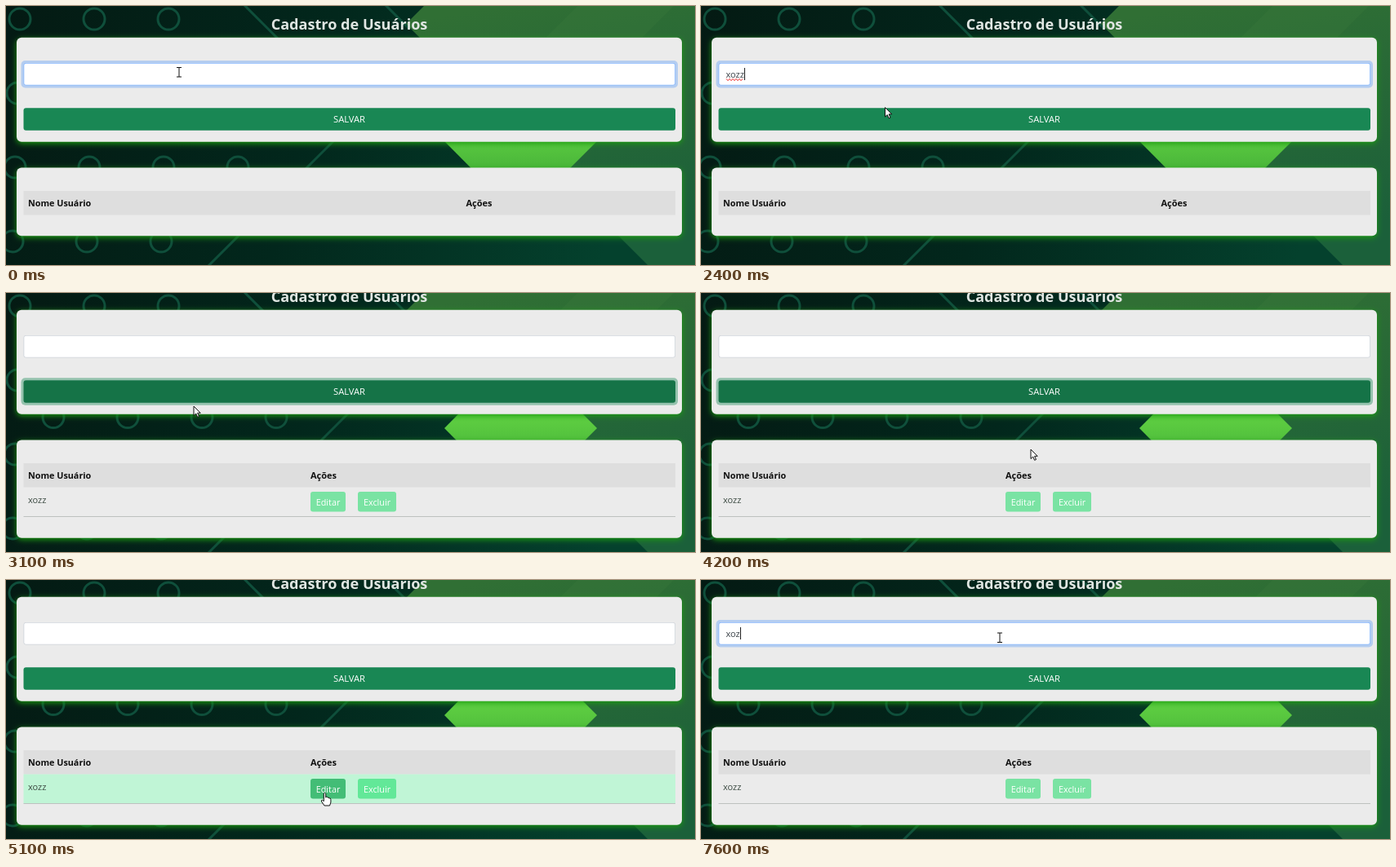
These frames come from a looping animation (844x318 px, 8 s). An HTML page with a canvas:

```html
<!DOCTYPE html>
<html lang="pt-BR">
<head>
<meta charset="utf-8">
<title>Cadastro de Usuários</title>
<style>
html, body { margin: 0; width: 100%; height: 100%; overflow: hidden; background: #02231a; }
canvas { display: block; }
</style>
</head>
<body>
<canvas id="stage" width="844" height="318"></canvas>
<script>
const c = document.getElementById('stage').getContext('2d');
const LOOP = 8000, NAME = 'xozz', TEAL = '#0f4f3b';
const FONT = '"Open Sans", "Noto Sans", sans-serif';

// Moments of the story, in ms
const PRESS = 2900, SAVED = 3100, BLUR = 5000, EDIT = 5300, REFOCUS = 6500, ERASE = 7300;

// Areas in page coordinates: x, y, width, height
const FIELD = [21.5, 70, 798.5, 27.5], SAVE = [21.5, 125.3, 798.5, 27.4], ROW = [21.5, 256.5, 798.5, 36];
const ACTIONS = { Editar: [373, 262, 43, 24.5], Excluir: [431, 262, 47, 24.5] };

const clamp = (v, a, b) => Math.min(b, Math.max(a, v));
const mix = (a, b, k) => `rgb(${a.map((v, i) => Math.round(v + (b[i] - v) * k))})`;
const grow = ([x, y, w, h], d) => [x - d, y - d, w + 2 * d, h + 2 * d];

function pointer(t) {
  let x = 212, y = 81;
  const glide = (from, to, tx, ty) => {
    const k = 1 - (1 - clamp((t - from) / (to - from), 0, 1)) ** 2;
    x += (tx - x) * k;
    y += (ty - y) * k;
  };
  glide(2000, 2800, 230, 139);
  glide(3600, 4200, 404, 192);
  glide(4400, 5000, 390.5, 261);
  glide(5400, 6200, 366, 70.5);
  return [x, y];
}

const scrollAt = t => t >= SAVED ? 18 : 0;

function over(t, [x, y, w, h]) {
  const [px, py] = pointer(t), v = py + scrollAt(t);
  return px >= x && px < x + w && v >= y && v < y + h;
}

// Hover amount with a 150 ms fade
function hover(t, area) {
  let n = 0;
  for (let i = 0; i < 6; i++) n += over(t - i * 25, area);
  return n / 6;
}

function letters(t) {
  if (t < SAVED) return clamp(Math.floor((t - 300) / 380) + 1, 0, 4);
  return t < EDIT ? 0 : t < ERASE ? 4 : 3;
}

function poly(fill, ...pts) {
  c.beginPath();
  pts.forEach(([x, y]) => c.lineTo(x, y));
  c.closePath();
  c.fillStyle = fill;
  c.fill();
}

function box(area, r, fill) {
  c.beginPath();
  c.roundRect(...area, r);
  c.fillStyle = fill;
  c.fill();
}

function text(s, x, y, size, color, weight = 400, align = 'left') {
  c.font = `${weight} ${size}px ${FONT}`;
  c.textAlign = align;
  c.fillStyle = color;
  c.fillText(s, x, y);
}

function fade(x0, y0, x1, y1, ...colors) {
  const g = c.createLinearGradient(x0, y0, x1, y1);
  colors.forEach((v, i) => g.addColorStop(i / (colors.length - 1), v));
  return g;
}

// Diagonal stroke, going left for a negative dx
function diagonal(x, y, dx) {
  c.beginPath();
  c.moveTo(x, y);
  c.lineTo(x + dx, y + Math.abs(dx));
  c.stroke();
}

function background() {
  c.fillStyle = fade(0, 0, 760, 200, '#041a13', '#02271c', '#04412d');
  c.fillRect(0, 0, 844, 318);
  c.strokeStyle = TEAL;
  c.lineWidth = 3;
  for (let k = 0; k < 7; k++) {
    const n = Math.abs(k - 4) < 2 ? 4 : 3;
    for (let i = 0; i < n; i++) {
      c.beginPath();
      c.arc(17 - 1.5 * k + 45.5 * (k % 2) + 91 * i, 16 + 45.5 * k, 13, 0, 7);
      c.stroke();
    }
  }
  diagonal(291, -2, 45);
  diagonal(464, -2, 30);
  diagonal(425, 142, -180);
  poly(fade(600, 0, 660, 300, '#306f34', '#1b603a'), [490, 22], [512, 0], [844, 0], [844, 318], [786, 318]);
  poly('#39773a66', [780, 38], [818, 0], [700, 0], [662, 38]);
  poly(fade(0, 149, 0, 199, '#60d142', '#4ab63a'), [630, 72], [724, 166], [630, 260], [537, 166]);
}

function card(y, h) {
  c.save();
  c.shadowColor = '#1a9c0e';
  c.shadowBlur = 7;
  c.shadowOffsetY = 2;
  box([13, y, 815, h], 6, '#ebebeb');
  c.restore();
}

function squiggle(x0, x1, y) {
  c.beginPath();
  for (let i = 0; x0 + 2 * i < x1; i++) c.lineTo(x0 + 2 * i, y + (i % 2 ? 1.2 : -1.2));
  c.strokeStyle = '#e33';
  c.lineWidth = 1;
  c.stroke();
}

function field(t) {
  const focus = t < PRESS || t >= REFOCUS, rest = t < PRESS ? 1400 : REFOCUS;
  const s = NAME.slice(0, letters(t));
  if (focus) box(grow(FIELD, 3), 5, '#b4cdf0');
  box(FIELD, 3, focus ? '#86b7fe' : '#ced4da');
  box(grow(FIELD, -0.8), 2, '#fff');
  text(s, 30.5, 88.3, 11, '#3c4349');
  const end = 30.5 + c.measureText(s).width;
  if (t >= 1500 && t < PRESS) squiggle(31, end, 90.5);
  // Steady while typing, then blinking
  const lit = t < rest || Math.floor((t - rest) / 500) % 2 === 0;
  if (focus && s && lit) {
    c.fillStyle = '#222';
    c.fillRect(Math.round(end), 76, 1, 15);
  }
}

function saveButton(t) {
  const focus = t >= PRESS && t < BLUR;
  if (focus) box(grow(SAVE, 3), 5, '#94c2ad');
  const fill = focus && t < SAVED ? '#146c43'
    : mix([25, 135, 84], [21, 115, 71], focus ? 1 : hover(t, SAVE));
  box(SAVE, 3, fill);
  text('SALVAR', 420.5, 143, 11.2, '#fff', 400, 'center');
}

function table(t, filled) {
  card(198.4, filled ? 120.4 : 83.8);
  box([21.5, 227, 798.5, 29.5], 0, '#dedede');
  text('Nome Usuário', 27, 246, 10.8, '#111', 700);
  text('Ações', filled ? 373 : 563.5, 246, 11, '#111', 700);
  if (!filled) return;
  const active = over(t, ROW);
  if (active) box(ROW, 0, '#c0f5d6');
  box([21.5, 292, 798.5, 1], 0, '#bdc1bf');
  text(NAME, 27, 275.5, 11, '#3c4a42');
  const idle = active ? [98, 232, 152] : [122, 227, 163];
  for (const [label, area] of Object.entries(ACTIONS)) {
    box(area, 3, mix(idle, [67, 189, 118], hover(t, area)));
    text(label, area[0] + area[2] / 2, 279, 10.8, '#fff', 400, 'center');
  }
}

const arrow = new Path2D('M0 0V11.5L2.7 9L4.6 13.3L6.5 12.5L4.6 8.3H8.2Z');
const hand = new Path2D('M-1.2 1.2Q0 -.8 1.2 1.2V6L2 5.3Q3.2 5 3.6 6.2Q5 5.6 5.6 7Q7.4 6.6 7.4 8.5V12L6 16H-.5L-4 11Q-4.6 9 -2.8 9.3L-1.2 10.6Z');
const beam = new Path2D('M-3 -5.5H3M-3 6H3M0 -5.5V6');

function cursor(t) {
  c.save();
  c.translate(...pointer(t));
  c.lineWidth = 1;
  c.lineJoin = 'round';
  c.strokeStyle = '#111';
  c.fillStyle = '#fff';
  const links = t < SAVED ? [SAVE] : [SAVE, ...Object.values(ACTIONS)];
  const shape = over(t, FIELD) ? beam : links.some(area => over(t, area)) ? hand : arrow;
  if (shape !== beam) c.fill(shape);
  c.stroke(shape);
  c.restore();
}

function draw(t) {
  background();
  c.save();
  c.translate(0, -scrollAt(t));
  text('Cadastro de Usuários', 420.5, 29, 18.1, '#e0e6e2', 700, 'center');
  card(38.8, 128);
  field(t);
  saveButton(t);
  table(t, t >= SAVED);
  c.restore();
  cursor(t);
}

const start = performance.now();
function tick() {
  draw((performance.now() - start) % LOOP);
  requestAnimationFrame(tick);
}
tick();
</script>
</body>
</html>
```
